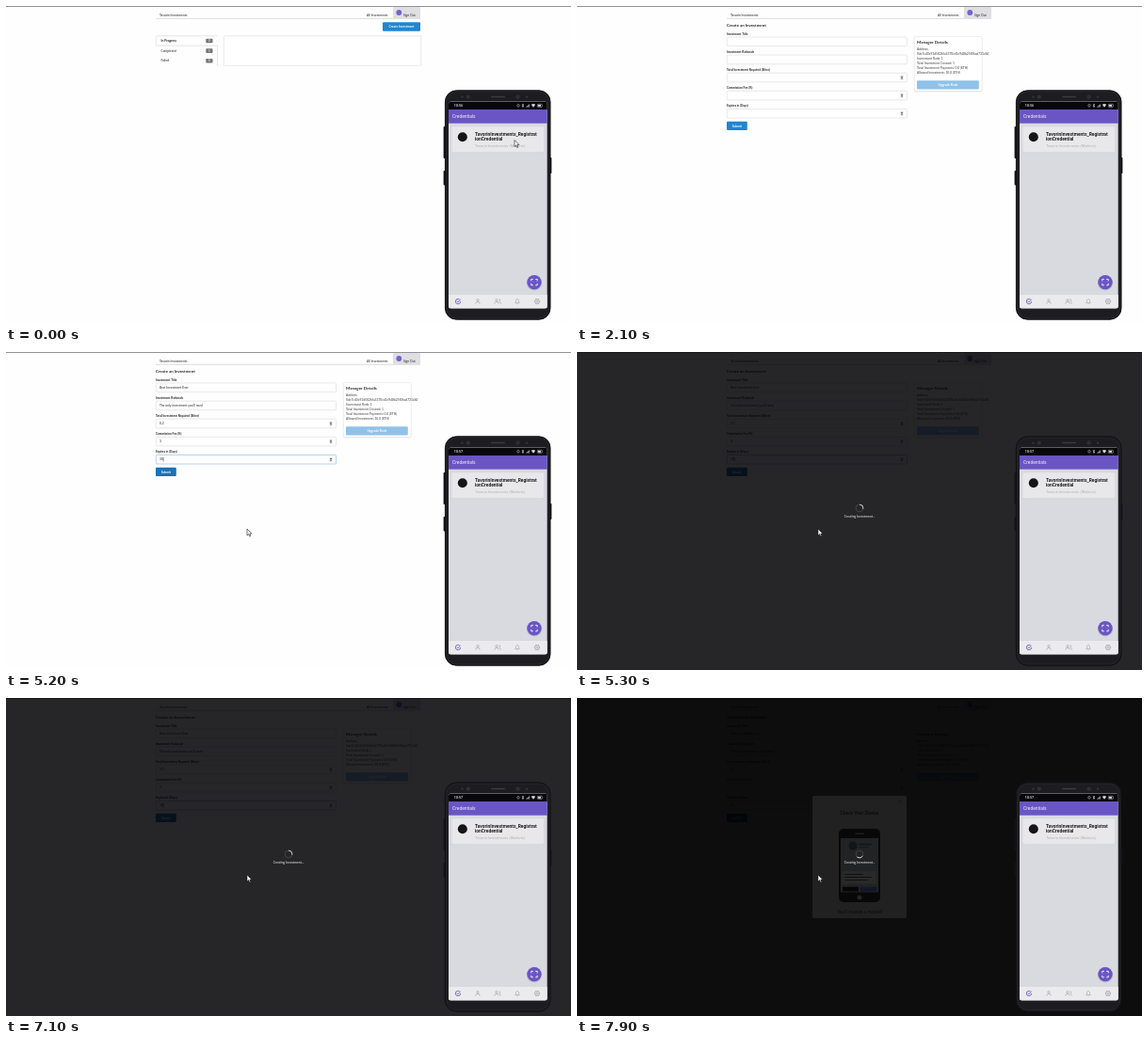
Recreate the animation shown at these times as an HTML page with a canvas. Size 600 by 338 pixels, loop 8 s.

```html
<!DOCTYPE html>
<html lang="en">
<head>
<meta charset="utf-8">
<title>Create an investment</title>
<style>
html, body { margin: 0; width: 100%; height: 100%; overflow: hidden; background: #fefefe; }
canvas { display: block; width: 100vw; height: 100vh; }
</style>
</head>
<body>
<canvas id="stage"></canvas>
<script>
const LOOP = 8000, W = 600, H = 338;
const FORM_AT = 1000, TYPE_AT = 2200, FILLED_AT = 3200, HOVER_AT = 4700, DIM_AT = 5250, MODAL_AT = 7450;
const BRAND = 'Tavorin Investments';
const BLUE = '#2185d0', PURPLE = '#6a55c5', LINE = '#d9d9dc', INK = '#222';
const LATO = 'Lato, sans-serif', ROBOTO = 'Roboto, sans-serif';

const canvas = document.getElementById('stage');
const c = canvas.getContext('2d');

// Pointer path: time, x, y
const path = [
  [50, 540, 142.5], [850, 418, 20], [1450, 418, 20], [1950, 200, 36],
  [3450, 127, 58], [3800, 131, 85.5], [4000, 131, 87], [4350, 170, 126],
  [4650, 170, 126], [5050, 256, 188]
];
const pointerShown = t => t < 2000 || t >= 3500;

const fields = [
  ['Investment Title', 'Best Investment Ever'],
  ['Investment Rationale', "The only investment you'll need"],
  ['Total Investment Required (Ether)', '0.2'],
  ['Commission Fee (%)', '3'],
  ['Expires in (Days)', '30']
];

const clamp = v => Math.max(0, Math.min(1, v));
const ease = v => v * v * (3 - 2 * v);

function text(s, x, y, size, color = INK, weight = 400, family = LATO, align = 'left') {
  c.font = `${weight} ${size}px ${family}`;
  c.textAlign = align;
  c.fillStyle = color;
  c.fillText(s, x, y);
}

function box(x, y, w, h, r, fill, stroke, lw = 0.6) {
  c.beginPath();
  c.roundRect(x, y, w, h, r);
  if (fill) { c.fillStyle = fill; c.fill(); }
  if (stroke) { c.strokeStyle = stroke; c.lineWidth = lw; c.stroke(); }
}

function dot(x, y, r, fill) {
  c.beginPath();
  c.arc(x, y, r, 0, Math.PI * 2);
  c.fillStyle = fill;
  c.fill();
}

function lines(color, lw, ...polys) {
  c.strokeStyle = color;
  c.lineWidth = lw;
  c.beginPath();
  for (const p of polys) {
    c.moveTo(p[0], p[1]);
    for (let i = 2; i < p.length; i += 2) c.lineTo(p[i], p[i + 1]);
  }
  c.stroke();
}

function ring(x, y, r, color, lw, from = 0, to = Math.PI * 2) {
  c.beginPath();
  c.arc(x, y, r, from, to);
  c.strokeStyle = color;
  c.lineWidth = lw;
  c.stroke();
}

function button(x, y, w, h, label, fill) {
  box(x, y, w, h, 1, fill);
  text(label, x + w / 2, y + h / 2 + 1.2, 3.3, '#fff', 700, LATO, 'center');
}

function header() {
  c.fillStyle = '#fefefe';
  c.fillRect(0, 0, W, H);
  c.fillStyle = '#77777a';
  c.fillRect(0, 0, W, 0.8);
  lines('#cfcfd2', 0.7, [159, 13.3, 440, 13.3]);
  text(BRAND, 163, 10.6, 3.35);
  text('All Investments', 383, 10.6, 3.35);
  box(411, 1, 29, 12.2, 0.5, '#dfdee2');
  dot(417.3, 7, 2.9, '#7363d2');
  text('Sign Out', 422, 10.6, 3.35);
}

function listPage(t) {
  button(400, 17.3, 40, 9.4, 'Create Investment', t > 780 ? '#1678c2' : BLUE);
  lines(LINE, 0.7, [224.5, 31.8, 160, 31.8, 159.3, 32.5, 159.3, 41.5, 160, 42.2, 224.5, 42.2, 224.5, 63.5]);
  [['In Progress', '0', 700], ['Completed', '1', 400], ['Failed', '0', 400]].forEach(([name, n, weight], i) => {
    const y = 37 + i * 10.6;
    text(name, 164.5, y + 1.2, 3.35, INK, weight);
    box(212.3, y - 2.3, 7.2, 4.6, 0.8, '#76767a');
    text(n, 215.9, y + 1, 2.8, '#fff', 700, LATO, 'center');
  });
  box(231.3, 31.8, 209.5, 31.5, 0.8, '#fff', LINE);
}

function valueAt(i, t) {
  if (t >= FILLED_AT) return fields[i][1];
  const n = i ? 0 : Math.ceil((t - TYPE_AT) / 15 - 4);
  return fields[i][1].slice(0, Math.max(0, Math.min(n, 20)));
}

function formPage(t) {
  text('Create an Investment', 159, 22.2, 4.4, INK, 700);
  const focus = t >= FILLED_AT ? 4 : t >= TYPE_AT ? 0 : -1;
  fields.forEach(([label], i) => {
    const y = 33 + i * 19.1;
    const value = valueAt(i, t);
    text(label, 159, y - 2.1, 3.1, INK, 700);
    box(159.3, y, 191.2, 9.6, 0.9, '#fff', i === focus ? '#85b7d9' : LINE);
    text(value, 163, y + 6, 3.3);
    if (i > 1) {
      box(343.5, y + 2.6, 3, 4.6, 0.4, '#dededf');
      c.fillStyle = '#444';
      c.beginPath();
      c.moveTo(344, y + 4.5); c.lineTo(345, y + 3); c.lineTo(346, y + 4.5);
      c.moveTo(344, y + 5.3); c.lineTo(345, y + 6.8); c.lineTo(346, y + 5.3);
      c.fill();
    }
    if (i === focus && i === 4 && Math.floor((t - 4900) / 530) % 2 === 0) {
      const x = 163.4 + c.measureText('').width + textWidth(value);
      lines('#222', 0.5, [x, y + 2.7, x, y + 7]);
    }
  });
  button(159, 122.8, 21.8, 9.3, 'Submit', t >= HOVER_AT ? '#1a72b8' : BLUE);
  managerCard();
}

function textWidth(s) {
  c.font = '400 3.3px ' + LATO;
  return c.measureText(s).width;
}

function managerCard() {
  box(358.2, 33.2, 72, 58, 1, '#e2e2e4');
  box(358.2, 32.6, 72, 58, 1, '#fff', '#dddde0', 0.5);
  text('Manager Details', 361, 40, 4.5, INK, 700);
  ['Address:', '0xb7c40e91d5826fa3370cd1e948b25f06ad731c84', 'Investment Rank: 1', 'Total Investment Created: 1',
    'Total Investment Payments: 0.0 (ETH)', 'Allowed Investment: 10.0 (ETH)']
    .forEach((s, i) => text(s, 361, 46.6 + i * 5.05, 3.3, '#3c3c3e'));
  button(361, 79.2, 65.8, 9.2, 'Upgrade Rank', '#90c2e8');
}

function modal(k) {
  c.save();
  c.globalAlpha = k;
  box(250, 104, 100, 130, 1.5, '#202120');
  text('Check Your Device', 300, 123.5, 4.9, '#0a0a0a', 700, LATO, 'center');
  lines('#111', 0.6, [341, 108.5, 344, 111.5], [344, 108.5, 341, 111.5]);
  box(278, 139, 44, 78, 5, '#080809');
  box(295, 143.5, 10, 1.4, 0.7, '#1c1c1d');
  box(280, 149, 40, 57.5, 0.5, '#222324');
  dot(293, 157, 4.5, '#151517');
  box(299, 154.5, 14, 2, 1, '#161617');
  box(299, 158, 11, 1.2, 0.6, '#19191a');
  box(281.5, 184, 37, 13.5, 1, '#29292a');
  [[284, 187, 20], [284, 190, 29], [284, 193, 25]].forEach(([x, y, w]) => box(x, y, w, 0.9, 0.4, '#111'));
  box(282, 200.8, 17, 4.6, 0.5, '#060607');
  box(301, 200.8, 17, 4.6, 0.5, '#11162b');
  dot(300, 212, 2.5, '#252526');
  text("You'll receive a request", 300, 228.7, 4.8, '#0a0a0a', 400, LATO, 'center');
  c.restore();
}

function loader(t) {
  const a = (t - 5300) / 600 * Math.PI * 2 - Math.PI / 2;
  ring(300, 166, 3.9, 'rgba(255,255,255,.17)', 0.8);
  ring(300, 166, 3.9, '#f4f4f4', 0.8, a, a + Math.PI / 2 + 0.2);
  text('Creating Investment...', 300, 176.1, 3.4, '#f4f4f4', 400, LATO, 'center');
}

function person(x, y, color) {
  ring(x, y - 1.3, 1.2, color, 0.6);
  ring(x, y + 2.6, 2.2, color, 0.6, Math.PI, 0);
}

function navBar() {
  const y = 314, grey = '#9c9da3';
  c.fillStyle = '#ebebed';
  c.fillRect(470, 307, 105, 14.5);
  ring(480, y, 2.7, PURPLE, 0.8, 0, 5.4);
  lines(PURPLE, 0.8, [478.7, y - 0.2, 479.8, y + 1, 482.7, y - 2.3]);
  person(501, y, grey);
  person(521, y, grey);
  ring(523.6, y - 1.3, 1.1, grey, 0.6, -1.6, 1.6);
  ring(523.3, y + 2.6, 2.2, grey, 0.6, -1.3, 0);
  lines(grey, 0.6, [540.7, y + 1.6, 541.4, y + 0.6, 541.6, y - 1.5, 543, y - 2.8, 544.4, y - 1.5, 544.6, y + 0.6, 545.3, y + 1.6, 540.7, y + 1.6],
    [542.5, y + 2.7, 543.5, y + 2.7]);
  ring(564, y, 1, grey, 0.6);
  ring(564, y, 2.5, grey, 0.7);
  for (let i = 0; i < 6; i++) {
    const u = Math.cos(i * Math.PI / 3), v = Math.sin(i * Math.PI / 3);
    lines(grey, 0.8, [564 + u * 2.5, y + v * 2.5, 564 + u * 3.2, y + v * 3.2]);
  }
}

function statusBar(t) {
  c.fillStyle = '#08080a';
  c.fillRect(470, 101.5, 105, 8.7);
  text(t < FILLED_AT ? '10:56' : '10:57', 475.8, 107.3, 3.7, '#eee', 500, ROBOTO);
  const w = '#d8d8da';
  ring(544, 105.8, 1.3, w, 0.5);
  lines(w, 0.6, [548, 104, 549.8, 107, 548, 107, 549.8, 104]);
  for (let i = 0; i < 4; i++) lines(w, 0.6, [552.5 + i, 107.5, 552.5 + i, 106.8 - i * 0.8]);
  c.beginPath();
  c.moveTo(560, 107.7); c.lineTo(557.8, 104.8); c.quadraticCurveTo(560, 103.3, 562.2, 104.8);
  c.fillStyle = w;
  c.fill();
  box(564.3, 104.3, 5, 3, 0.6, null, w, 0.5);
  box(565, 104.9, 3, 1.8, 0.2, w);
}

function phone(t) {
  box(464.6, 128, 3, 34, 0.8, '#161619');
  box(464.6, 175, 3, 15.5, 0.8, '#161619');
  box(577, 161, 2.4, 17, 0.8, '#161619');
  box(466.4, 89.8, 111.6, 243.4, 12, '#1d1d21', '#101013', 1);
  box(468, 91.3, 108.4, 240.4, 10.8, null, '#29292e', 0.5);
  box(515, 95.7, 15, 1.6, 0.8, '#3a3a3f');
  dot(484.5, 96.6, 1.2, '#34343a');
  dot(490.8, 96.6, 2.1, '#303038');
  dot(543.6, 96.6, 2.3, '#2d2d35');
  dot(553, 96.6, 1.2, '#34343a');

  c.save();
  c.beginPath();
  c.roundRect(470, 101.5, 104.7, 220, 2.5);
  c.clip();
  c.fillStyle = '#d9dae0';
  c.fillRect(470, 101, 105, 221);
  statusBar(t);
  c.fillStyle = PURPLE;
  c.fillRect(470, 110, 105, 14.7);
  text('Credentials', 474, 119, 4.9, '#f1effa', 400, ROBOTO);
  box(473.3, 128.8, 98, 27.4, 2, '#cdced3');
  box(473.3, 128.2, 98, 27.4, 2, '#e8e8ea');
  dot(484.8, 139.3, 5, '#151517');
  text('TavorinInvestments_Registrat', 498, 137.6, 4.9, '#1d1d20', 700, ROBOTO);
  text('ionCredential', 498, 143.2, 4.9, '#1d1d20', 700, ROBOTO);
  text(BRAND + ' (Markets)', 498, 150.2, 3.95, '#b2b2b7', 400, ROBOTO);
  dot(561, 294.4, 8, '#b9b8c6');
  dot(561, 293.6, 7.7, PURPLE);
  for (const sx of [-1, 1]) for (const sy of [-1, 1])
    lines('#fff', 0.9, [561 + sx * 3.2, 293.6 + sy * 1.2, 561 + sx * 3.2, 293.6 + sy * 3.2, 561 + sx * 1.2, 293.6 + sy * 3.2]);
  navBar();
  c.restore();
}

function pointerAt(t) {
  if (t <= path[0][0]) return path[0].slice(1);
  for (let i = 1; i < path.length; i++) {
    const [t0, x0, y0] = path[i - 1], [t1, x1, y1] = path[i];
    if (t < t1) {
      const k = ease((t - t0) / (t1 - t0));
      return [x0 + (x1 - x0) * k, y0 + (y1 - y0) * k];
    }
  }
  return path[path.length - 1].slice(1);
}

function pointer(t) {
  const [x, y] = pointerAt(t);
  c.save();
  c.translate(x, y);
  c.beginPath();
  [[0, 0], [0, 7], [1.6, 5.5], [2.7, 8], [3.8, 7.5], [2.8, 5.1], [4.9, 5]].forEach(p => c.lineTo(...p));
  c.closePath();
  c.fillStyle = '#fff';
  c.fill();
  c.strokeStyle = '#151515';
  c.lineWidth = 0.6;
  c.stroke();
  c.restore();
}

function draw(t) {
  header();
  t < FORM_AT ? listPage(t) : formPage(t);
  if (t >= DIM_AT) {
    c.fillStyle = 'rgba(3,2,5,.86)';
    c.fillRect(0, 0, W, H);
    const k = ease(clamp((t - MODAL_AT) / 300));
    if (k > 0) {
      c.fillStyle = `rgba(0,0,0,${0.64 * k})`;
      c.fillRect(0, 0, W, H);
      modal(k);
    }
    loader(t);
  }
  phone(t);
  if (pointerShown(t)) pointer(t);
}

function fit() {
  const d = window.devicePixelRatio || 1;
  const w = Math.round(innerWidth * d), h = Math.round(innerHeight * d);
  if (canvas.width !== w || canvas.height !== h) {
    canvas.width = w;
    canvas.height = h;
  }
  c.setTransform(w / W, 0, 0, h / H, 0, 0);
}

const start = performance.now();
function tick(now) {
  fit();
  draw(Math.max(0, now - start) % LOOP);
  requestAnimationFrame(tick);
}
requestAnimationFrame(tick);
</script>
</body>
</html>
```
